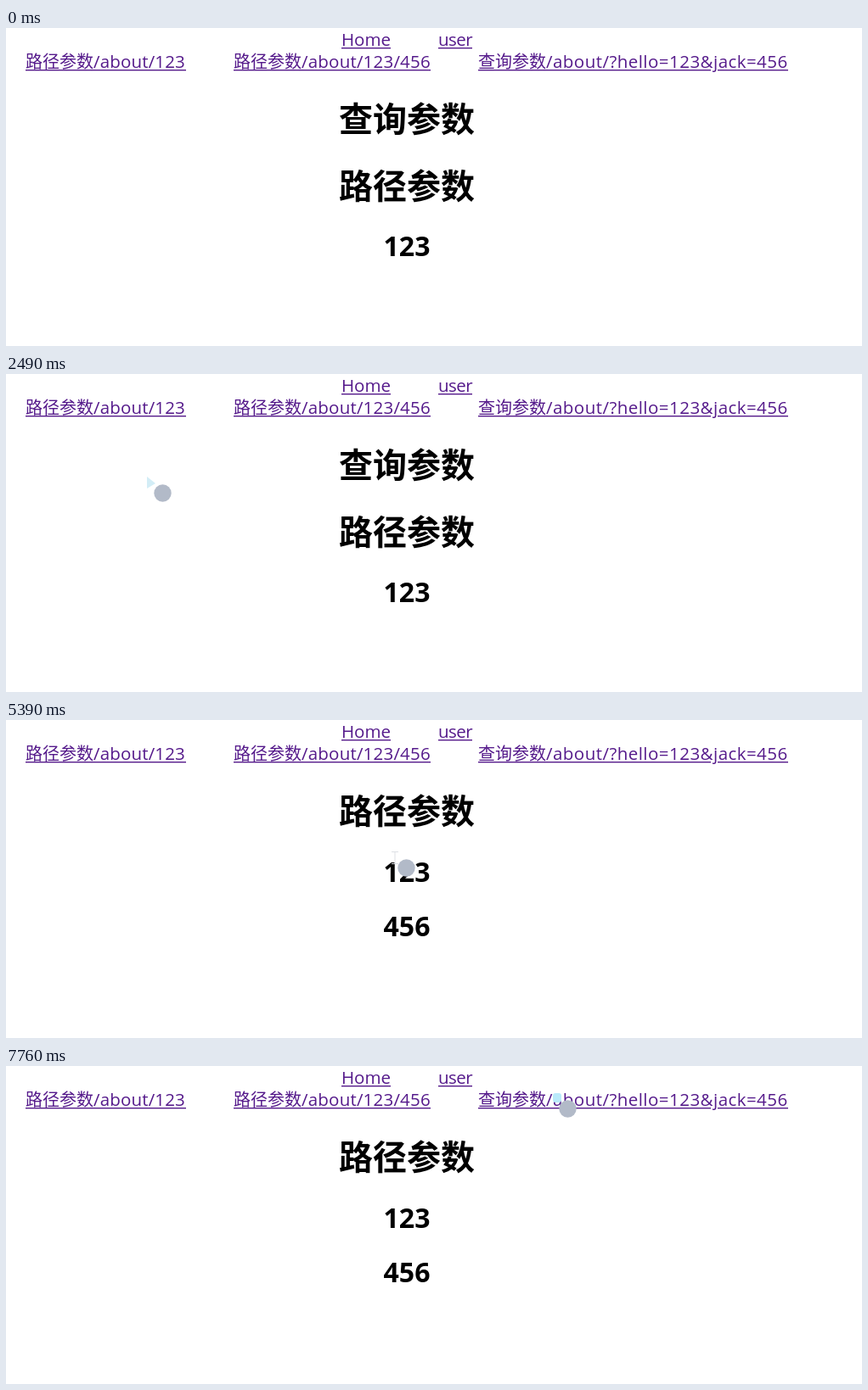
Recreate the animation shown at these times as an HTML page. Size 1008x375 px, loop 7.99 s.

```html
<!DOCTYPE html>
<html lang="zh-CN">
<head>
<meta charset="utf-8">
<title>路径参数</title>
<style>
html, body { margin: 0; width: 100%; height: 100%; overflow: hidden; background: #fff; }
svg { display: block; width: 100%; height: 100%; }
text { font-family: "Open Sans", "Noto Sans CJK SC", "Noto Sans CJK", sans-serif; }
.link { fill: #551a8b; font-size: 20px; }
.link .latin { font-size: 20.5px; }
.link.active { fill: #f00; }
.h1, .h2 { font-weight: 700; text-anchor: middle; }
.h1 { font-size: 40px; }
.h2 { font-size: 32px; }
</style>
</head>
<body>
<svg id="stage" viewBox="0 0 1008 375">
  <g id="links"></g>
  <g id="query"></g>
  <g id="path"></g>
  <g id="cursor">
    <path id="arrow" d="M0 0V14L10 8Z" fill="#d3edf6"/>
    <rect id="hand" x="1" y="1" width="10" height="11" rx="3" fill="#b9eafa"/>
    <path id="beam" d="M1 .5H9M5 .5V14.5M1 14.5H9" fill="none" stroke="#dde0e5"/>
    <circle cx="18.5" cy="19.5" r="10.2" fill="#b2bac8"/>
  </g>
</svg>
<script>
const LOOP = 7990;
const PACE = 79;
const $ = id => document.getElementById(id);

function add(parent, tag, attrs, text) {
  const el = document.createElementNS("http://www.w3.org/2000/svg", tag);
  for (const key in attrs) el.setAttribute(key, attrs[key]);
  if (text) el.textContent = text;
  parent.appendChild(el);
  return el;
}

function addLink(x, right, y, label, latin, gap) {
  const el = add($("links"), "g", { class: "link" });
  if (label) add(el, "text", { x, y }, label);
  add(el, "text", { x: x + label.length * 20, y, class: "latin", "letter-spacing": gap }, latin);
  const line = (a, b) => add(el, "rect", { x: a, y: y + 2, width: b - a, height: 1.4 });
  if (latin.includes("j")) {
    // the underline leaves room for the descender
    line(x, 830);
    line(838, right);
  } else line(x, right);
  return { el, x, right, top: y - 19, bottom: y + 5 };
}
const home = addLink(395, 453, 21, "", "Home", 0);
const user = addLink(509, 549, 21, "", "user", -.5);
const one = addLink(23, 212, 47, "路径参数", "/about/123", .16);
const two = addLink(268, 500, 47, "路径参数", "/about/123/456", .2);
const query = addLink(556, 921, 47, "查询参数", "/about/?hello=123&jack=456", .46);
const links = [home, user, one, two, query];

const heading = (page, cls, y, text) => add($(page), "text", { class: cls, x: 472, y }, text);
heading("query", "h1", 122, "查询参数");
heading("query", "h1", 201, "路径参数");
heading("query", "h2", 268.5, "123");
heading("path", "h1", 122, "路径参数");
heading("path", "h2", 190.5, "123");
heading("path", "h2", 254.5, "456");

// Each move runs straight on from the last one, in even steps
const moves = [];
let last = { x: 725, y: 367 };
function go(start, steps, x, y) {
  moves.push({ start, steps, x, y, from: last });
  last = { x, y };
}
go(130, 6, 197, 215);
go(604, 5, 376, 108);
go(1000, 2, 368, 95);
go(1310, 8, 145, 36);
go(1942, 1, 110, 26);
go(2021, 2, 80, 48);
go(2180, 2, 43, 80);
go(2338, 4, 207, 134);
go(2654, 5, 57, 43);
go(3050, 3, 100, 26);
go(3360, 2, 100, 24);
go(3500, 5, 230, 108);
go(3890, 4, 351, 42);
go(4210, 2, 364, 37);
go(4760, 5, 498, 255);
go(5155, 4, 453, 155);
go(5471, 2, 147, 60);
go(5630, 3, 110, 27);
go(5867, 2, 115, 30);
go(6025, 4, 280, 192);
go(6341, 2, 533, 240);
go(6500, 4, 450, 140);
go(6816, 3, 390, 28);
go(7210, 4, 696, 60);
go(7526, 4, 643, 31);

function pointerAt(t) {
  const move = moves.filter(m => m.start <= t).pop();
  if (!move) return null;
  const { start, steps, x, y, from } = move;
  const u = Math.min(1, Math.floor((t - start) / PACE + 1.1) / steps);
  return { x: Math.round(from.x + (x - from.x) * u), y: Math.round(from.y + (y - from.y) * u) };
}

function shapeAt(x, y, onPath) {
  const inside = (l, r, t, b) => x >= l && x <= r && y >= t && y <= b;
  if (links.some(k => inside(k.x, k.right, k.top, k.bottom))) return "hand";
  const text = inside(392, 552, 85, 130) || (onPath
    ? inside(445, 500, 158, 198) || inside(445, 500, 222, 262)
    : inside(392, 552, 164, 209) || inside(445, 500, 236, 276));
  return text ? "beam" : "arrow";
}

const show = (id, on) => $(id).setAttribute("display", on ? "inline" : "none");

function draw(t) {
  const during = (a, b) => t >= a && t < b;
  const onPath = during(4610, 5870) || t >= 7130;
  show("path", onPath);
  show("query", !onPath);
  one.el.classList.toggle("active", during(3360, 3440) || during(5790, 5870));
  two.el.classList.toggle("active", during(4520, 4610) || during(6970, 7130));

  const pos = pointerAt(t);
  show("cursor", pos);
  if (!pos) return;
  const shape = shapeAt(pos.x + 5, pos.y + 8, onPath);
  for (const id of ["arrow", "hand", "beam"]) show(id, id === shape);
  $("cursor").setAttribute("transform", `translate(${pos.x} ${pos.y})`);
}

const begin = performance.now();
function tick() {
  draw((performance.now() - begin) % LOOP);
  requestAnimationFrame(tick);
}
tick();
</script>
</body>
</html>
```
